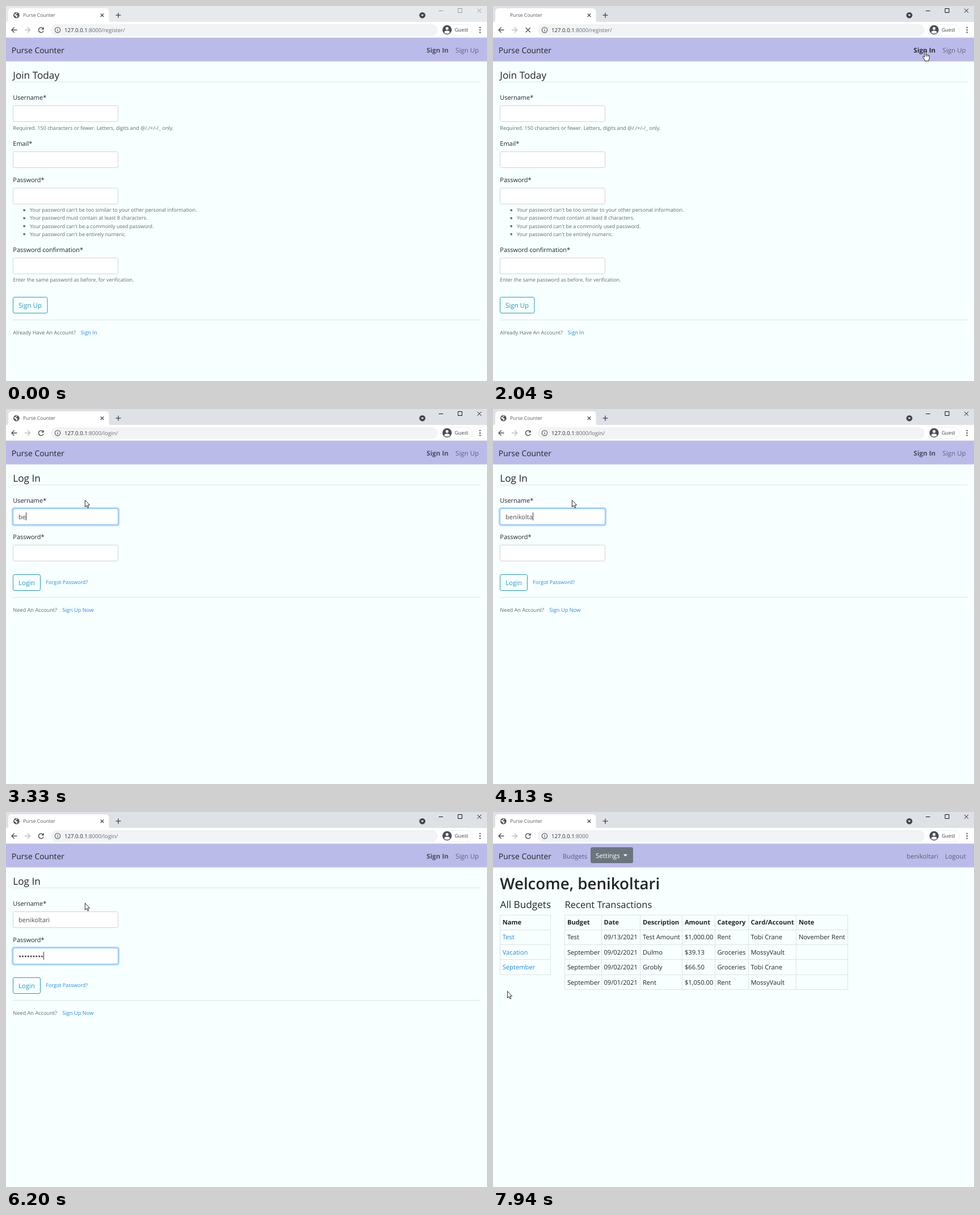
Recreate the animation shown at these times as an HTML page. Size 848x660 px, loop 8000 ms.

```html
<!DOCTYPE html>
<html lang="en">
<head>
<meta charset="utf-8">
<title>Purse Counter</title>
<style>
html, body { margin: 0; width: 100%; height: 100%; overflow: hidden; background: #f8ffff; }
svg { display: block; width: 848px; height: 660px; }
text { font-family: "Open Sans", "Noto Sans", sans-serif; text-rendering: geometricPrecision; white-space: pre; }
</style>
</head>
<body>
<svg id="stage" viewBox="0 0 848 660"></svg>
<script>
const LOOP = 8000;
const APP = 'Purse Counter', USER = 'benikoltari', CARD = 'Tobi Crane', BANK = 'MossyVault';
const DARK = '#212529', MUTED = '#62696f', LINK = '#1f8ce6', TEAL = '#219cbc', ICON = '#505357', LINE = '#dee2e6';

// Markup helpers
const text = (x, y, size, str, fill = DARK, extra = '') =>
  `<text x="${x}" y="${y}" font-size="${size}" fill="${fill}" ${extra}>${str}</text>`;
const rect = (x, y, w, h, fill, extra = '') =>
  `<rect x="${x}" y="${y}" width="${w}" height="${h}" fill="${fill}" ${extra}/>`;
const dot = (x, y, r, fill, extra = '') => `<circle cx="${x}" cy="${y}" r="${r}" fill="${fill}" ${extra}/>`;
const path = (d, stroke, width = 1.2, extra = '') =>
  `<path d="${d}" fill="none" stroke="${stroke}" stroke-width="${width}" ${extra}/>`;
const group = (id, body, extra = '') => `<g id="${id}" ${extra}>${body}</g>`;
const rule = y => rect(12, y, 825, 1, LINE);
const input = y => rect(12.5, y, 185, 28, '#fff', 'rx="2.6" stroke="#ced4da"');
const label = (y, str) => text(12.3, y, 10.95, str);
const button = (y, w, str) =>
  rect(12.5, y, w, 28, 'none', `rx="2.6" stroke="${TEAL}"`) + text(22, y + 18.2, 11.5, str, TEAL);
const focusRing = (id, y) => group(id,
  rect(11, y - 1.5, 188, 31, 'none', 'rx="4" stroke="#007bff" stroke-opacity=".27" stroke-width="2.6"') +
  rect(12.5, y, 185, 28, 'none', 'rx="2.6" stroke="#80bdff"'));

function chrome() {
  const globe = dot(18.3, 16.2, 5.4, ICON) +
    '<path d="M14 14.5l3-.6 1.4-2.6 1.6.6-.7 1.7-1.5.8.2 1.5 2 .3.6 1.6-1.3 2.4-1.6-.2-.3-2-2.8-1.3z" fill="#fff" opacity=".85"/>';
  return rect(0, 0, 848, 29, '#dee1e6', 'id="strip"') +
    '<path d="M0 28.5q4 0 4-4V10q0-6 6-6h165.500q6 0 6 6v14.500q0 4 4 4z" fill="#fff"/>' +
    rect(0, 28, 848, 28, '#fff') + rect(0, 55, 848, 1, '#e6e8eb') +
    group('favicon', globe) +
    text(30, 19.4, 8.5, APP, '#54575b') +
    path('M166.700 13.400l5.600 5.600m0-5.600l-5.600 5.600', '#3c4043') +
    path('M193.500 16.200h9m-4.500-4.500v9', '#3c4043', 1.3) +
    dot(734, 16.3, 5.4, '#44474b') + '<path d="M731.500 15h5l-2.500 3z" fill="#fff"/>' +
    group('controls', path('M763 8.500h7.500M797 4.500h7v7h-7zM831 4.800l7 7m0-7l-7 7', 'currentColor', 1)) +
    path('M19.500 42.200h-9.500m4.600-4.600l-4.600 4.600 4.600 4.600', ICON, 1.4) +
    path('M33 42.200h9.500m-4.600-4.600l4.600 4.600-4.600 4.600', '#bcbec1', 1.4) +
    group('reload', path('M65.200 39.400a4.400 4.400 0 1 0 .9 4.200', ICON, 1.5) +
      `<path d="M66.800 37v4.500h-4.500z" fill="${ICON}"/>`) +
    group('stop', path('M57.700 38.200l8 8m0-8l-8 8', ICON, 1.4)) +
    rect(79, 32, 682, 20.5, '#f1f3f4', 'rx="10.25"') +
    dot(91, 42.2, 4.7, 'none', `stroke="${ICON}" stroke-width="1.1"`) +
    path('M91 41.400v3.300m0-5.200v1.100', ICON, 1.1) +
    `<text x="103" y="46" font-size="9.65" fill="#2b2e32">127.0.0.1<tspan id="url" fill="#6a6e73"></tspan></text>` +
    rect(767, 32.5, 55, 19.5, '#fff', 'rx="9.7" stroke="#eceef0"') +
    dot(777.6, 42, 8.2, '#4b4d57') + dot(777.6, 39.6, 2.5, '#fff') +
    '<path d="M772.600 46.800q0-3.400 5-3.400t5 3.400q-2 2-5 2t-5-2z" fill="#fff"/>' +
    text(791, 45.2, 8.75, 'Guest', '#3c4043') +
    [38, 42.2, 46.4].map(y => dot(835.7, y, 1.2, ICON)).join('');
}

function navbar() {
  const grey = 'rgba(0,0,0,.5)';
  const signs = text(741.6, 81.6, 11.6, 'Sign In', '#000', 'id="signIn" font-weight="700"') +
    text(792.6, 81.6, 11.5, 'Sign Up', '#000', 'id="signUp"');
  const member = text(123, 81.6, 11.3, 'Budgets', grey) +
    rect(172, 62, 75, 28, '#6c757d', 'rx="3"') + text(181, 80.8, 11.5, 'Settings', '#fff') +
    '<path d="M229.700 74.500h7.300l-3.650 3.800z" fill="#fff"/>' +
    text(785, 81.6, 11.2, USER, grey, 'text-anchor="end"') + text(796.8, 81.6, 11.4, 'Logout', grey);
  return rect(0, 56, 848, 41.5, '#bbbbea') + text(9.8, 83, 13.9, APP) +
    group('guestNav', signs) + group('memberNav', member);
}

function registerPage() {
  const hints = ["can't be too similar to your other personal information.", 'must contain at least 8 characters.',
    "can't be a commonly used password.", "can't be entirely numeric."];
  return text(12.3, 127.6, 17.2, 'Join Today') + rule(133) +
    label(165, 'Username*') + input(175.5) +
    text(12.3, 217.8, 9.07, 'Required. 150 characters or fewer. Letters, digits and @/./+/-/_ only.', MUTED) +
    label(245.8, 'Email*') + input(256.5) +
    label(309.5, 'Password*') + input(320.5) +
    hints.map((h, i) => dot(32.2, 359.3 + 14.1 * i, 1.9, MUTED) +
      text(42, 362.3 + 14.1 * i, 8.97, 'Your password ' + h, MUTED)).join('') +
    label(432.6, 'Password confirmation*') + input(443.5) +
    text(12.3, 485.2, 8.9, 'Enter the same password as before, for verification.', MUTED) +
    button(512.5, 60.5, 'Sign Up') + rule(552) +
    text(12.3, 577.7, 9.17, 'Already Have An Account?', MUTED) + text(131.7, 577.7, 9.3, 'Sign In', LINK);
}

function loginPage() {
  return text(12.3, 127.6, 17.2, 'Log In') + rule(133) +
    label(165, 'Username*') + input(175.5) + focusRing('ringUser', 175.5) +
    text(22, 193.8, 11.1, '', '#495057', 'id="name"') +
    label(229, 'Password*') + input(239.5) + focusRing('ringPass', 239.5) +
    Array.from({ length: 11 }, (_, i) => dot(24.7 + 4.85 * i, 254, 1.6, '#40464c', 'class="bullet"')).join('') +
    rect(22, 182, 1, 14, '#33383d', 'id="caret"') +
    button(291.5, 48, 'Login') + text(70.3, 308.2, 9, 'Forgot Password?', LINK) + rule(331) +
    text(12.3, 357.2, 9.2, 'Need An Account?', MUTED) + text(99.3, 357.2, 9.3, 'Sign Up Now', LINK);
}

function table(cols, rows, fills = []) {
  const lineY = r => Math.round(180.7 + 26.2 * r), edges = cols.map(Math.floor);
  const left = edges[0], width = edges[edges.length - 1] - left + 1;
  let out = '';
  for (let r = 0; r <= rows.length; r++) out += rect(left, lineY(r), width, 1, LINE);
  edges.forEach(x => out += rect(x, 181, 1, lineY(rows.length) - 181, LINE));
  rows.forEach((row, r) => row.forEach((cell, c) =>
    out += text(cols[c] + 4.4, 198 + 26.4 * r, 11.2, cell, r && fills[c] || DARK, r ? '' : 'font-weight="700"')));
  return out;
}

function homePage() {
  return text(12.3, 136, 27.7, 'Welcome, ' + USER, DARK, 'font-weight="600"') +
    text(12.5, 168.7, 17.2, 'All Budgets') + text(126.6, 168.7, 16.5, 'Recent Transactions') +
    table([12.3, 101], [['Name'], ['Test'], ['Vacation'], ['September']], [LINK]) +
    table([126.5, 191, 259.5, 333.5, 391, 450, 534.5, 625], [
      ['Budget', 'Date', 'Description', 'Amount', 'Category', 'Card/Account', 'Note'],
      ['Test', '09/13/2021', 'Test Amount', '$1,000.00', 'Rent', CARD, 'November Rent'],
      ['September', '09/02/2021', 'Dulmo', '$39.13', 'Groceries', BANK, ''],
      ['September', '09/02/2021', 'Grobly', '$66.50', 'Groceries', CARD, ''],
      ['September', '09/01/2021', 'Rent', '$1,050.00', 'Rent', BANK, '']]);
}

function cursors() {
  const look = 'fill="#fff" stroke="#111" stroke-width=".9" stroke-linejoin="round"';
  return group('arrow', `<path ${look} d="M.4.4v12l2.700-2.600 1.900 4.200 1.900-.8-1.900-4.100h3.600z"/>`) +
    group('hand', `<path ${look} d="M-1.300 9.500V1.300a1.250 1.250 0 0 1 2.500 0V6q1.200-.8 2.200.3 1.300-.6 2.100.5 1.900-.4 1.900 1.400v3.300q0 1.600-1.100 3v2.300H-.6v-1.800L-4 10.500q-.9-1.700.6-2 .9 0 2.100 1.800z"/>` +
      path('M1.200 6v3M3.400 6.400v2.700M5.500 7v2.200', '#111', .7));
}

const stage = document.getElementById('stage');
stage.innerHTML = rect(0, 0, 848, 660, '#f8ffff') + chrome() + navbar() +
  group('register', registerPage()) + group('login', loginPage()) + group('home', homePage()) + cursors();

const el = {};
stage.querySelectorAll('[id]').forEach(n => el[n.id] = n);
const bullets = [...stage.querySelectorAll('.bullet')];
const show = (node, on) => node.setAttribute('display', on ? 'inline' : 'none');
const ramp = (t, from, span) => Math.min(1, Math.max(0, (t - from) / span));

// Pointer waypoints: time, x, y
const WAY = [[270, 772, 655], [480, 768, 380], [720, 760, 120], [830, 762, 82], [1030, 800, 77], [1100, 799, 76],
  [1300, 795, 76], [1600, 795, 76], [1770, 762, 80], [2070, 762, 80], [2220, 575, 112], [2390, 293, 144],
  [2520, 185, 156], [2670, 139, 160], [7680, 139, 160], [7740, 105, 124], [7800, 50, 103], [7870, 4, 200], [7940, 25, 315]];
const NAME_KEYS = [3200, 3330, 3400, 3530, 3730, 3800, 3930, 4000, 4130, 4200, 4330];
const PASS_KEYS = [4680, 5280, 5340, 5540, 5670, 5740, 5870, 6000, 6200, 6600, 6860];
const CLICK = 1970, LOGIN = 2140, TAB = 4470, ENTER = 7190, ROUTE = 7330, HOME = 7470, BLINK = 530;

function pointer(t) {
  const i = WAY.findIndex(p => p[0] > t);
  if (i < 0) return WAY[WAY.length - 1].slice(1);
  if (!i) return null;
  const [a, b] = [WAY[i - 1], WAY[i]], k = ramp(t, a[0], b[0] - a[0]);
  return [a[1] + (b[1] - a[1]) * k, a[2] + (b[2] - a[2]) * k];
}

function drawPointer(t) {
  const p = pointer(t), bar = p && p[1] > 66 && p[1] < 92 && t < HOME;
  const onIn = bar && p[0] > 738 && p[0] < 785, onUp = bar && p[0] > 788 && p[0] < 838;
  el.signIn.setAttribute('fill-opacity', onIn ? .78 : .6);
  el.signUp.setAttribute('fill-opacity', onUp ? .7 : .48);
  show(el.hand, onIn || onUp);
  show(el.arrow, p && !onIn && !onUp);
  if (p) for (const c of [el.hand, el.arrow]) c.setAttribute('transform', `translate(${p[0]} ${p[1]})`);
}

function drawForm(t) {
  const typed = keys => keys.filter(k => k <= t).length;
  const n = typed(NAME_KEYS), m = typed(PASS_KEYS), tabbed = ramp(t, TAB, 170);
  el.name.textContent = USER.slice(0, n);
  bullets.forEach((b, i) => show(b, i < m));
  el.ringUser.setAttribute('opacity', Math.min(ramp(t, LOGIN, 150), 1 - tabbed));
  el.ringPass.setAttribute('opacity', tabbed);
  const inPass = t >= TAB;
  const last = Math.max(...[LOGIN, TAB, ...NAME_KEYS, ...PASS_KEYS].filter(k => k <= t));
  show(el.caret, Math.floor((t - last) / BLINK) % 2 === 0);
  const width = inPass ? 4.85 * m : n ? el.name.getComputedTextLength() : 0;
  el.caret.setAttribute('x', Math.round(22 + width));
  el.caret.setAttribute('y', inPass ? 246 : 182);
}

function draw(t) {
  const active = t >= CLICK;
  el.strip.setAttribute('fill', active ? '#dee1e6' : '#e7eaed');
  el.controls.setAttribute('color', active ? '#111' : '#969696');
  const busy = t >= CLICK + 30 && t < LOGIN + 70 || t >= ENTER && t < ROUTE;
  show(el.favicon, !busy);
  show(el.reload, !busy);
  show(el.stop, busy);
  el.url.textContent = ':8000' + (t < LOGIN ? '/register/' : t < ROUTE ? '/login/' : '');
  const home = t >= HOME, login = t >= LOGIN && !home;
  show(el.register, t < LOGIN);
  show(el.login, login);
  show(el.home, home);
  show(el.guestNav, !home);
  show(el.memberNav, home);
  if (login) drawForm(t);
  drawPointer(t);
}

const start = performance.now();
function tick() {
  draw((performance.now() - start) % LOOP);
  requestAnimationFrame(tick);
}
tick();
</script>
</body>
</html>
```
